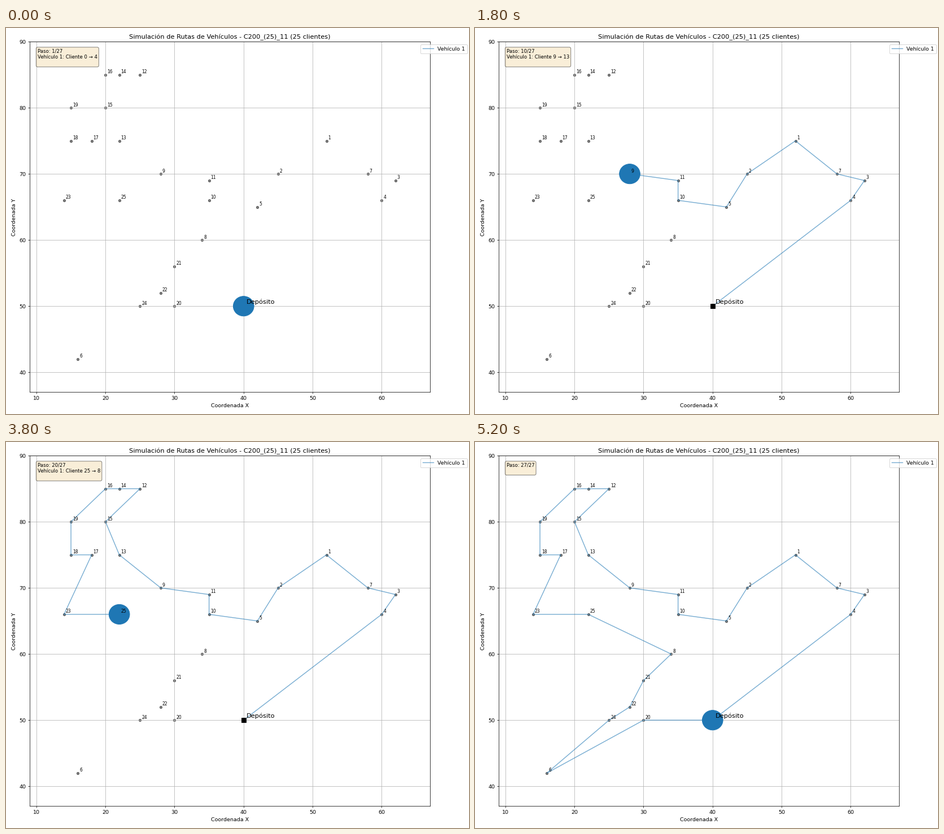
A matplotlib script for the animation above (5.4 s loop, 820x683 px).

```python
import matplotlib.pyplot as plt
from matplotlib.animation import FuncAnimation
from matplotlib.patches import Circle

DEPOT = (40, 50)
CLIENTS = [
    (52, 75), (45, 70), (62, 69), (60, 66), (42, 65),
    (16, 42), (58, 70), (34, 60), (28, 70), (35, 66),
    (35, 69), (25, 85), (22, 75), (22, 85), (20, 80),
    (20, 85), (18, 75), (15, 75), (15, 80), (30, 50),
    (30, 56), (28, 52), (14, 66), (25, 50), (22, 66),
]
ROUTE = [0, 4, 3, 7, 1, 2, 5, 10, 11, 9, 13, 15, 12, 14, 16,
         19, 18, 17, 23, 25, 8, 21, 22, 24, 6, 20, 0]
STEPS = len(ROUTE)

nodes = [DEPOT] + CLIENTS
path = [nodes[i] for i in ROUTE]

fig, ax = plt.subplots(figsize=(12, 10), dpi=820 / 12)


def label(text, point, offset, size):
    ax.annotate(text, point, xytext=(offset, offset),
                textcoords="offset points", fontsize=size)


ax.scatter(*zip(*CLIENTS), c="black", s=20, alpha=0.5)
ax.plot(*DEPOT, "ks", markersize=8, zorder=2.5)
label("Depósito", DEPOT, 5, 12)
for n, point in enumerate(CLIENTS, 1):
    label(str(n), point, 3, 8)

trail, = ax.plot([], [], color="tab:blue", alpha=0.6, label="Vehículo 1")
vehicle = ax.add_patch(Circle(DEPOT, 1.5, color="tab:blue", zorder=2.8))
info = ax.text(0.02, 0.98, "", transform=ax.transAxes, fontsize=9, va="top",
               bbox=dict(boxstyle="round", facecolor="wheat", alpha=0.5))

ax.set(xlim=(9, 67), ylim=(37, 90),
       xlabel="Coordenada X", ylabel="Coordenada Y",
       title="Simulación de Rutas de Vehículos - C200_(25)_11 (25 clientes)")
ax.grid(True)
ax.legend(loc="upper right", bbox_to_anchor=(1.1, 1))
fig.tight_layout()


def update(i):
    trail.set_data(*zip(*path[:i + 1]))
    vehicle.center = path[i]
    text = f"Paso: {i + 1}/{STEPS}\n"
    if i + 1 < STEPS:
        text += f"Vehículo 1: Cliente {ROUTE[i]} → {ROUTE[i + 1]}\n"
    info.set_text(text)
    return trail, vehicle, info


anim = FuncAnimation(fig, update, frames=STEPS, interval=200,
                     repeat=True, repeat_delay=0, blit=False)
plt.show()
```
